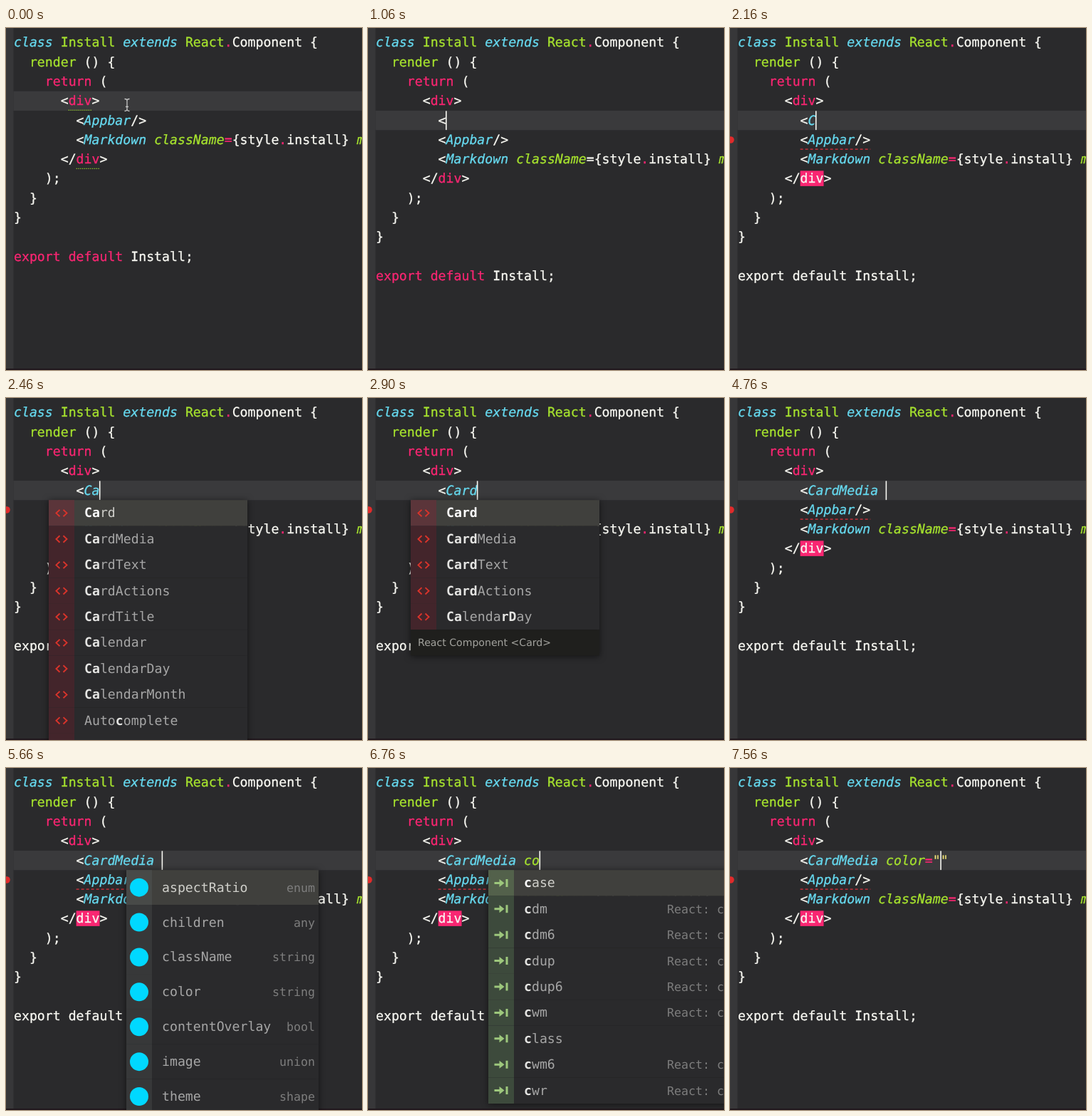
An HTML page that plays this animation: 500x480 px, repeating every 8 s.

```html
<!DOCTYPE html>
<html lang="en">
<head>
<meta charset="utf-8">
<title>Editor autocompletion</title>
<style>
  html, body { margin: 0; width: 100%; height: 100%; overflow: hidden; background: #2a2a2c; }
  svg { display: block; width: 500px; height: 480px; }
  text {
    font: 18.2px "DejaVu Sans Mono", monospace;
    white-space: pre;
    text-rendering: geometricPrecision;
  }
  .code { stroke-width: .3px; }
  .w { fill: #f8f8f2; stroke: #f8f8f2; }
  .p { fill: #f92672; stroke: #f92672; }
  .g { fill: #a6e22e; stroke: #a6e22e; }
  .s { fill: #e6db74; stroke: #e6db74; }
  .c, .a { font-style: italic; }
  .c { fill: #66d9ef; stroke: #66d9ef; }
  .a { fill: #a6e22e; stroke: #a6e22e; }
  .item { fill: #a6a6a6; }
  .item.on { fill: #cfcfca; }
  .hit { font-weight: bold; fill: #e4e4e2; }
  .on .hit { fill: #fff; }
  .label { font-size: 16.6px; fill: #7d7d7d; }
  .note { font: 14.1px "DejaVu Sans", sans-serif; fill: #a3a39e; }
  .popup { filter: drop-shadow(0 1px 5px rgba(0, 0, 0, .55)); }
</style>
</head>
<body>
<svg id="stage" viewBox="0 0 500 480" xml:space="preserve"></svg>
<script>
const LOOP = 8000, LEFT = 11, CHAR = 10.957, LINE = 27.3, TOP = 6.8;
const stage = document.getElementById('stage');
const colX = col => LEFT + col * CHAR;
const lineY = n => TOP + n * LINE;
const esc = s => s.replace(/&/g, '&amp;').replace(/</g, '&lt;');

// Latest entry whose time has come
const at = (list, t) => list.filter(e => e[0] <= t).pop();

const rect = (x, y, w, h, fill) =>
  `<rect x="${x}" y="${y}" width="${w}" height="${h}" fill="${fill}"/>`;
const stroke = (d, color, width, extra = '') =>
  `<path d="${d}" fill="none" stroke="${color}" stroke-width="${width}" ${extra}/>`;
const label = (x, y, cls, body, extra = '') =>
  `<text x="${x}" y="${y}" class="${cls}" ${extra}>${body}</text>`;

// Tokens are "class:text" strings
function codeLine(n, tokens) {
  const body = tokens.map(k => `<tspan class="${k[0]}">${esc(k.slice(2))}</tspan>`).join('');
  return label(LEFT, lineY(n) + 19.5, 'code', body);
}

const typed = [
  [0, ''], [1030, '<'], [2160, '<C'], [2400, '<Ca'], [2630, '<Car'], [2830, '<Card'],
  [4160, '<CardMedia'], [4760, '<CardMedia '], [6360, '<CardMedia c'],
  [6760, '<CardMedia co'], [7000, '<CardMedia col'], [7560, '<CardMedia color=""']
];
const blinks = [260, 1400, 1460, 1900, 2160, 3300, 3700, 4100, 4160, 4630, 4760,
  5260, 5660, 6060, 6360, 7500, 7560];

const kinds = {
  tag: { h: 36.4, bg: '#43252b', sel: '#5b353a' },
  prop: { h: 48.9, bg: '#373839', sel: '#484a48' },
  snippet: { h: 36.4, bg: '#3d4a3c', sel: '#53614b' }
};
const items = (kind, names) => names.split(' ').map(s => {
  const [name, type] = s.split(':');
  return { kind, name, type };
});
const cards = 'Card CardMedia CardText CardActions ';
const props = items('prop', 'aspectRatio:enum children:any className:string color:string ' +
  'contentOverlay:bool image:union theme:shape');
const colorProps = props.slice(3, 5);
const snippets = items('snippet', 'case cdm:c cdm6:c cdup:c cdup6:c cwm:c class cwm6:c cwr:c');
const tagPopup = (query, names, w, sel = 0) =>
  ({ x: 60, w, query, sel, rows: items('tag', names), note: 'React Component <' + names.split(' ')[sel] + '>' });
const propPopup = (query, rows, note) => ({ x: 169, w: 270, query, sel: 0, rows, note });

const popups = [
  [0, null],
  [2260, tagPopup('C', cards + 'CardTitle Checkbox Chip Calendar CalendarDay CalendarMonth', 283)],
  [2460, tagPopup('Ca', cards + 'CardTitle Calendar CalendarDay CalendarMonth Autocomplete Snackbar', 279)],
  [2700, tagPopup('Car', cards + 'CardTitle CalendarDay', 265)],
  [2900, tagPopup('Card', cards + 'CalendarDay', 265)],
  [3760, tagPopup('Card', cards + 'CalendarDay', 265, 1)],
  [4160, null],
  [4900, propPopup('', props)],
  [6430, { x: 169, w: 500, query: 'c', sel: 0, rows: snippets }],
  [6830, propPopup('co', colorProps.concat(items('snippet', 'const constructor continue console')), 'React property color')],
  [7060, propPopup('col', colorProps.concat(items('tag', 'col colgroup control collapse')), 'React property color')],
  [7560, null]
];

// Mark the letters matched in order by the query
function highlight(name, query) {
  let i = 0;
  return [...name].map(ch => {
    const hit = i < query.length && ch.toLowerCase() === query[i].toLowerCase();
    if (hit) i++;
    return hit ? `<tspan class="hit">${ch}</tspan>` : ch;
  }).join('');
}

function icon(kind, x, y) {
  if (kind === 'tag') {
    return stroke(`M${x - 2.5} ${y - 4.5}l-5 4.7l5 4.7M${x + 2.5} ${y - 4.5}l5 4.7l-5 4.7`, '#d9342b', 1.9);
  }
  if (kind === 'prop') return `<circle cx="${x}" cy="${y}" r="13" fill="#00d8ff"/>`;
  return `<path d="M${x - 9.5} ${y - 1.5}h7v-4l7 5.5l-7 5.5v-4h-7zM${x + 6.5} ${y - 5.5}h3v11h-3z" fill="#9dc77c"/>`;
}

function drawPopup(p) {
  const top = 143.2;
  let y = top, out = '';
  p.rows.forEach((row, i) => {
    const k = kinds[row.kind], on = i === p.sel, mid = y + k.h / 2;
    out += rect(p.x, y, p.w, k.h + .2, on ? '#40403d' : '#2a2a2c');
    out += rect(p.x, y, 36, k.h + .2, on ? k.sel : k.bg);
    out += icon(row.kind, p.x + 18, mid);
    out += label(p.x + 50, mid + 6, on ? 'item on' : 'item', highlight(row.name, p.query));
    if (row.type === 'c') out += label(420, mid + 6, 'label', 'React: component');
    else if (row.type) out += label(p.x + p.w - 5, mid + 6, 'label', row.type, 'text-anchor="end"');
    y += k.h;
  });
  if (p.note) {
    out += rect(p.x, y, p.w, 36.4, '#1f1f1d');
    out += label(p.x + 10, y + 23, 'note', esc(p.note));
  }
  return `<g class="popup">${out}</g>`;
}

function typedTokens(s) {
  const [tag, attr = ''] = s.slice(1).split(' ');
  const [name, value] = attr.split('=');
  const tokens = ['w:        ' + s.slice(0, 1), 'c:' + tag, 'w: ', 'a:' + name];
  return value ? tokens.concat('p:=', 's:' + value) : tokens;
}

function scene(t) {
  const split = t >= 530, broken = t >= 2160;
  const text = at(typed, t)[1], popup = at(popups, t)[1];
  const d = split ? 1 : 0, active = 3 + d;
  let out = rect(0, 0, 500, 480, '#2a2a2c') + rect(0, 0, 10.5, 480, '#373739');
  out += rect(10.5, lineY(active), 489.5, LINE, '#3a3a3c');
  out += rect(0, 478, 500, 2, '#21181d');
  if (broken) out += rect(colX(8), lineY(7) + 2.5, CHAR * 3, 21.5, '#f92672');

  out += codeLine(0, ['c:class', 'w: ', 'g:Install', 'w: ', 'c:extends', 'w: ', 'g:React', 'p:.', 'w:Component {']);
  out += codeLine(1, ['g:  render', 'w: () {']);
  out += codeLine(2, ['p:    return', 'w: (']);
  out += codeLine(3, ['w:      <', 'p:div', 'w:>']);
  if (split) out += codeLine(4, typedTokens(text));
  out += codeLine(4 + d, ['w:        <', 'c:Appbar', 'w:/>']);
  const eq = t >= 1030 && t < 1460 ? 'w:=' : 'p:=';
  out += codeLine(5 + d, ['w:        <', 'c:Markdown', 'w: ', 'a:className', eq, 'w:{style', 'p:.', 'w:install} ', 'a:markdown']);
  out += codeLine(6 + d, ['w:      </', (broken ? 'w' : 'p') + ':div', 'w:>']);
  out += codeLine(7 + d, ['w:    );']);
  out += codeLine(8 + d, ['w:  }']);
  out += codeLine(9 + d, ['w:}']);
  out += codeLine(11 + d, [(broken ? 'w' : 'p') + ':export default', 'w: Install;']);

  if (!split) {
    const dots = 'stroke-dasharray="1.4 1.4"';
    out += stroke(`M${colX(7)} 115.3h33M${colX(8)} 197.3h33`, '#8fc22c', 1.2, dots);
    out += stroke('M166.5 99.5q3.5 0 3.5 2.5q0 -2.5 3.5 -2.5M170 102v12M166.5 116.5q3.5 0 3.5 -2.5q0 2.5 3.5 2.5M168 110.5h4', '#c4c4c4', 1.3);
  }
  if (t >= 1130) out += `<circle cx="1" cy="${t < 1730 ? 129.5 : 157}" r="4.8" fill="#e02b2b"/>`;
  if (t >= 1730) out += stroke(`M${colX(8)} 170.2h98.6`, '#e0303c', 1.2, 'stroke-dasharray="4 3"');

  if (blinks.filter(b => b <= t).length % 2) {
    let col = 11;
    if (split) col = t < 630 ? 0 : 8 + text.length - (text.endsWith('"') ? 1 : 0);
    out += rect(colX(col) - .6, lineY(active) + .4, 1.6, LINE - .6, '#f8f8f2');
  }
  return popup ? out + drawPopup(popup) : out;
}

let shown = '';
function frame(now) {
  const next = scene(now % LOOP);
  if (next !== shown) stage.innerHTML = shown = next;
  requestAnimationFrame(frame);
}
frame(0);
</script>
</body>
</html>
```
